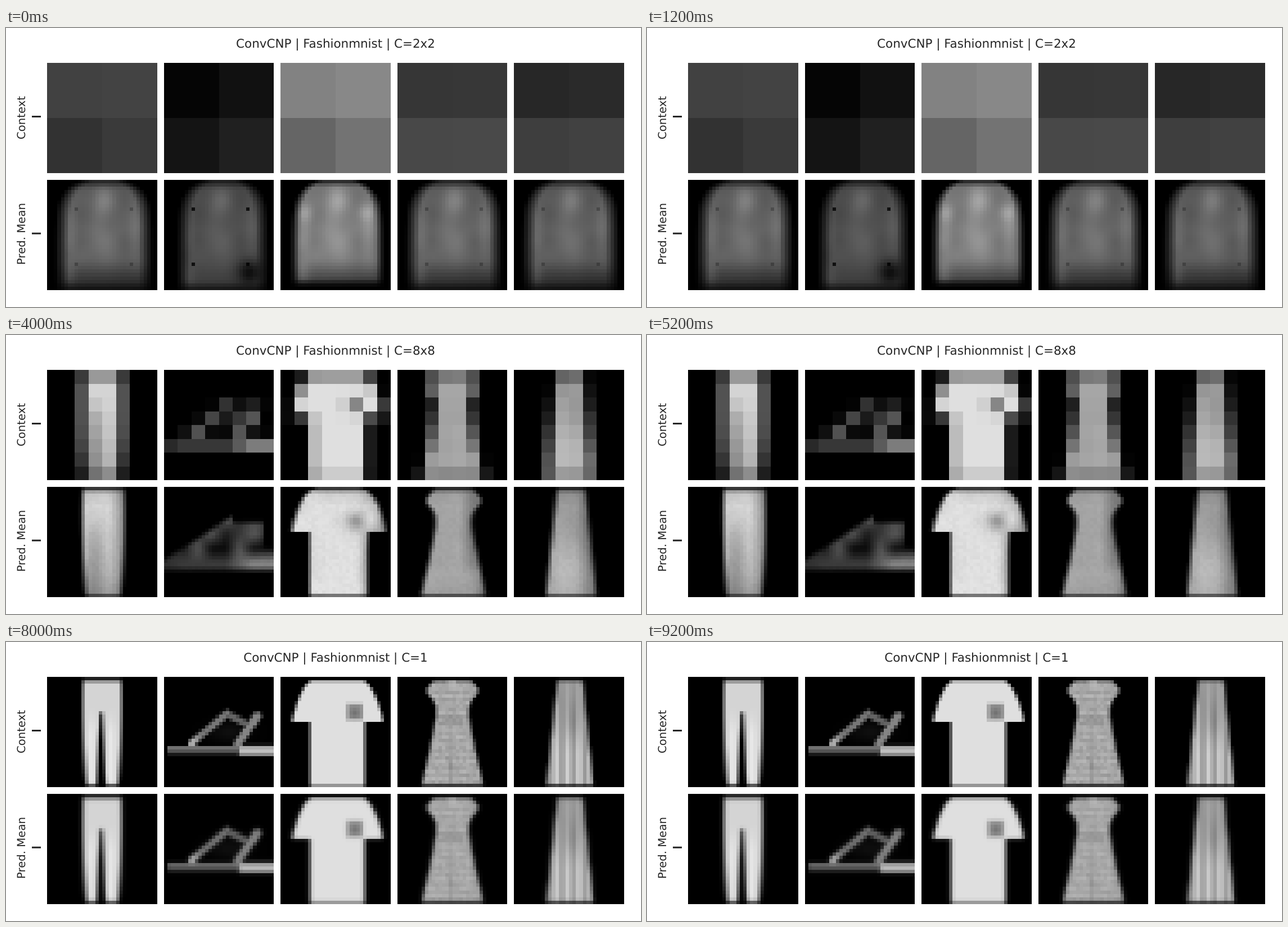
Recreate the animation shown at these times as an HTML page with a canvas. Size 1129x496 px, loop 10000 ms.

```html
<!DOCTYPE html>
<html lang="en">
<head>
<meta charset="utf-8">
<title>ConvCNP context resolution</title>
<style>
html, body { margin: 0; width: 100%; height: 100%; overflow: hidden; background: #fff; }
svg, canvas { position: absolute; left: 0; top: 0; width: 1129px; height: 496px; }
text {
  font-family: "DejaVu Sans", Verdana, sans-serif; fill: #262626;
  text-anchor: middle; text-rendering: geometricPrecision;
}
.title { font-size: 21.45px; }
.label { font-size: 19.66px; }
.stage { animation: show 10s step-end infinite; }
@keyframes show {
  0% { visibility: visible; }
  20%, 100% { visibility: hidden; }
}
</style>
</head>
<body>
<svg viewBox="0 0 1129 496">
  <text class="label" transform="translate(34 159.5) rotate(-90)">Context</text>
  <text class="label" transform="translate(34 366) rotate(-90)">Pred. Mean</text>
  <path d="M46 157.5h16M46 365.2h16" stroke="#262626" stroke-width="2.9"/>
</svg>
<script>
const SIZE = 32;
const clamp = (v, lo = 0, hi = 1) => Math.min(hi, Math.max(lo, v));
const ease = v => { const k = clamp(v); return k * k * (3 - 2 * k); };
const bell = d => Math.exp(-d * d);
const blob = (x, y, cx, cy, rx, ry) => bell((x - cx) / rx) * bell((y - cy) / ry);
const noise = (x, y) => {
  const s = Math.sin(x * 12.9898 + y * 78.233) * 43758.5453;
  return (s - Math.floor(s)) * 2 - 1;
};

// Square grids of grey values; functions are sampled at cell centres.
const grid = (fn, n = SIZE) => ({
  n, v: Float32Array.from({ length: n * n }, (_, i) => fn(i % n + 0.5, Math.floor(i / n) + 0.5))
});
const at = (g, x, y) => g.v[clamp(Math.floor(y), 0, g.n - 1) * g.n + clamp(Math.floor(x), 0, g.n - 1)];

function pool(g, n) {
  const k = g.n / n;
  return grid((x, y) => {
    let sum = 0;
    for (let j = 0; j < k; j++)
      for (let i = 0; i < k; i++) sum += at(g, (x - 0.5) * k + i, (y - 0.5) * k + j);
    return sum / (k * k);
  }, n);
}

function enlarge(g) {
  const k = SIZE / g.n;
  return grid((x, y) => {
    const u = x / k - 0.5, w = y / k - 0.5, i = Math.floor(u), j = Math.floor(w);
    const mix = row => at(g, i, row) * (1 - u + i) + at(g, i + 1, row) * (u - i);
    return mix(j) * (1 - w + j) + mix(j + 1) * (w - j);
  });
}

function blur(g, s) {
  const weight = [s, 1 - 2 * s, s];
  return grid((x, y) => {
    let sum = 0;
    for (let j = 0; j < 3; j++)
      for (let i = 0; i < 3; i++) sum += weight[i] * weight[j] * at(g, x - 1 + i, y - 1 + j);
    return sum;
  });
}

// Soft shapes, 1 inside and 0 outside.
const edge = (d, soft) => clamp(d / soft + 0.5);
const silhouette = (center, half, soft, top = 1.1, bottom = 31.3) => (x, y) =>
  edge(y - top, soft) * edge(bottom - y, soft) * edge(half(y) - Math.abs(x - center), soft);
const mound = (top, bottom, soft) => (x, y) => edge(y - top(x), soft) * edge(bottom - y, soft);

function stroke(x1, y1, x2, y2, width) {
  const dx = x2 - x1, dy = y2 - y1;
  return (x, y) => {
    const k = clamp(((x - x1) * dx + (y - y1) * dy) / (dx * dx + dy * dy));
    return clamp(width - Math.hypot(x - x1 - dx * k, y - y1 - dy * k));
  };
}

const capsule = silhouette(16.1, y => 7.8 + 0.8 * bell((y - 7) / 4) - 1.4 * Math.exp(-y / 1.5), 2.8, 0.3, 31.6);

// A garment has its cut (half width by height), its tone, and its coarse silhouette.
function tailored({ center, half, soft, tone, coarse = capsule, bottom }) {
  const body = silhouette(center, half, soft, 1.1, bottom);
  return {
    full: grid((x, y) => body(x, y) * tone(x, y)),
    medium: silhouette(center + 0.4, y => half(y) + 0.5, 1.8, 0.9, 31.5),
    coarse
  };
}

function trousers() {
  const gap = silhouette(15.7, y => 0.4 + 0.045 * (y - 10), 1.2, 10.3, 34);
  return tailored({
    center: 16, half: y => 5.6 - ((y - 8) / 23) ** 2, soft: 1.7,
    tone: (x, y) => (1 - gap(x, y)) * (212 + 20 * bell(Math.abs(x - 15.8) - 2.9) * ease((y - 8) / 10))
  });
}

function sandal() {
  const front = stroke(8, 19.3, 18.4, 10.6, 1.5), strap = stroke(18.4, 10.8, 24.4, 13.8, 1.5);
  const back = stroke(27.2, 11.4, 21.5, 19.5, 1.7);
  const sole = mound(() => 20, 22.3, 1), heel = mound(() => 19.9, 22.8, 1);
  return {
    full: grid((x, y) => Math.max(
      front(x, y) * (118 + 60 * blob(x, y, 8, 19, 2, 2)), strap(x, y) * 100, back(x, y) * 132,
      sole(x, y) * edge(x - 1, 1) * (y < 21 ? 112 : 84),
      heel(x, y) * edge(x - 21.7, 1) * (160 + 30 * bell(y - 21.5)),
      14 * blob(x, y, 19, 16, 6, 3))),
    medium: mound(x => x < 20 ? 8.5 + 0.64 * (20 - x) : x < 29 ? 10.4 : 17.5, 24, 2),
    coarse: mound(x => 5.5 + (x < 21 ? 15 * ((21 - x) / 20.6) ** 1.4 : 12 * ((x - 21) / 10.5) ** 2), 25.2, 3)
  };
}

function shirt() {
  return tailored({
    center: 16.55, half: y => y < 12.8 ? 13 * (y / 12) ** 0.22 : 7.9, soft: 1.2, bottom: 31.7,
    tone: (x, y) => 223 - 80 * edge(2.3 - Math.max(Math.abs(x - 21.6), Math.abs(y - 10.1)), 1)
      - 28 * blob(x, y, 21.5, 10.5, 1.5, 1.5),
    coarse: silhouette(16.7, y => 8.4 + (3.4 * clamp((y + 2) / 8)) * (1 - ease((y - 13.5) / 5.5)), 2.8, 0.7, 31.5)
  });
}

function flaredDress() {
  return tailored({
    center: 16.05, half: y => 4.8 + 2.7 * bell((y - 4) / 2.6) + 4.2 * clamp((y - 11) / 20) ** 1.2, soft: 1.3,
    tone: (x, y) => 167 + 10 * noise(x, y) + 7 * Math.sin(y * 2.6) + 50 * blob(x, y, 16, 1.5, 1.2, 0.7)
      - 28 * blob(x, y, 16, 12.6, 4, 1) - 20 * blob(x, y, 15.5, 26, 0.8, 5)
  });
}

function longDress() {
  return tailored({
    center: 16.25, half: y => 3.6 + 0.1 * y, soft: 1.4,
    tone: (x, y) => 156 + 24 * clamp((y - 8) / 14) - 18 * blob(x, y, 17, 13, 2, 5)
      + 28 * Math.cos((x - 15.6) * 1.9) * clamp(y / 26 + 0.15)
  });
}

// Spread the light of the context over the believed silhouette.
function spread(context, mask) {
  const shape = grid(mask), light = enlarge(context), cover = enlarge(pool(shape, context.n));
  return grid((x, y) =>
    Math.min(224, at(shape, x, y) * at(light, x, y) / Math.max(0.1, at(cover, x, y))) * (1 + 0.02 * noise(x, y)));
}

// With four context cells, every garment looks like a blurry pullover.
function pullover(context) {
  const mean = pool(context, 1).v[0], bright = ease((mean - 70) / 50), dim = ease((50 - mean) / 30);
  const mask = silhouette(16.5 + 0.7 * dim, y => (12.2 - 0.8 * dim) * (1 - Math.exp(-(y + 1.5) / 3.2)),
    4 - 1.4 * bright, 0.8, 31.2 - 1.5 * bright);
  const blotches = enlarge(grid(noise, 8));
  return grid((x, y) => {
    const arms = blob(Math.abs(x - 16.2), y, 9.3, 15, 2, 9);
    const cuffs = blob(x, y, 6.5, 29, 2, 4);
    let tone = 0.84 + 0.32 * blob(x, y, 16.5, 6, 3.2, 5) + 0.24 * blob(x, y, 16, 18, 5, 6)
      + 0.16 * arms + 0.25 * cuffs + 0.05 * at(blotches, x, y);
    tone *= 1 - 0.5 * ease((y - 22) / 9) * (1 - 0.6 * dim);
    tone += 0.22 * bright * blob(Math.abs(x - 16.2), y, 9, 9.5, 2.5, 2.5);
    tone -= 0.6 * dim * blob(x, y, 25, 26.5, 3.5, 3.5);
    if (x % 16 === 8.5 && y % 16 === 8.5) tone *= 0.75 + 0.25 * bright - 0.55 * dim;
    return (78 + 0.5 * mean) * mask(x, y) * tone;
  });
}

function refined({ full }) {
  const soft = blur(full, 0.2);
  return grid((x, y) => at(soft, x, y) * (1 + 0.03 * Math.cos(Math.PI * (x + y))));
}

const stages = [
  { cells: 2, caption: "2x2", predict: (item, context) => pullover(context) },
  { cells: 4, caption: "4x4", predict: (item, context) => spread(context, item.coarse) },
  { cells: 8, caption: "8x8", predict: (item, context) => spread(context, item.medium) },
  { cells: 16, caption: "16x16", predict: refined },
  { cells: 32, caption: "1", predict: item => blur(item.full, 0.09) }
];
const garments = [trousers, sandal, shirt, flaredDress, longDress].map(make => make());

const tile = document.createElement("canvas");
tile.width = tile.height = SIZE;

function paint(ctx, g, column, y) {
  const pen = tile.getContext("2d"), image = pen.createImageData(g.n, g.n);
  g.v.forEach((v, i) => image.data.set([v, v, v, 255], i * 4));
  pen.putImageData(image, 0, 0);
  const left = Math.round(73.2 + 207.5 * column), right = Math.round(268.8 + 207.5 * column);
  ctx.drawImage(tile, 0, 0, g.n, g.n, left, y, right - left, 196);
}

stages.forEach(({ cells, caption, predict }, index) => {
  const layer = document.createElement("div");
  layer.className = "stage";
  layer.style.animationDelay = `${index * 2 - 10}s`;
  layer.innerHTML = `<canvas width="1129" height="496"></canvas><svg viewBox="0 0 1129 496">
    <text class="title" x="586" y="35">ConvCNP | Fashionmnist | C=${caption}</text></svg>`;
  document.body.append(layer);
  const ctx = layer.querySelector("canvas").getContext("2d");
  ctx.imageSmoothingEnabled = false;
  garments.forEach((item, column) => {
    const context = pool(item.full, cells);
    paint(ctx, context, column, 62);
    paint(ctx, predict(item, context), column, 270);
  });
});
</script>
</body>
</html>
```
